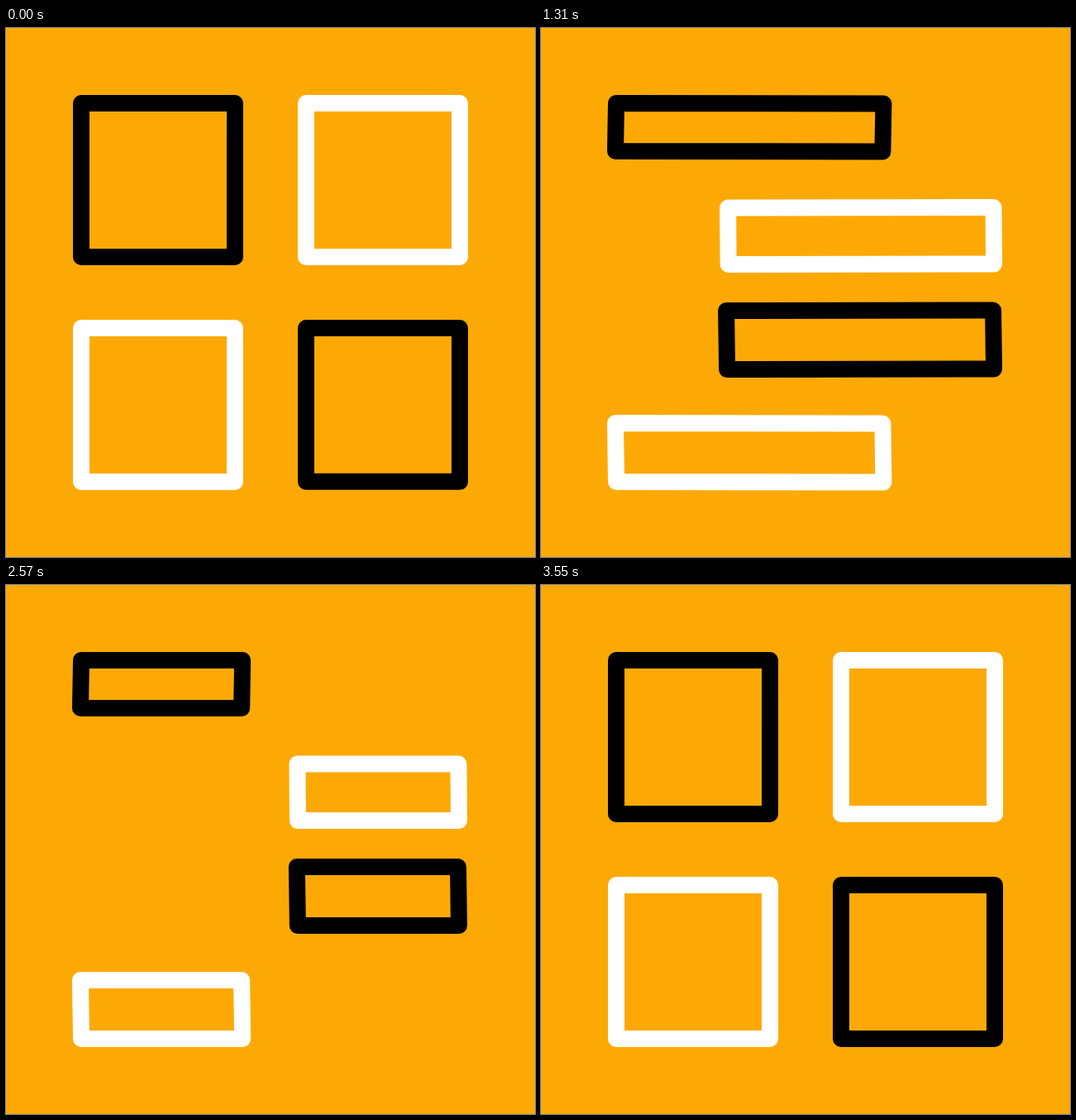
These frames come from a looping animation (640x640 px, 3.62 s). An HTML page:

```html
<!DOCTYPE html>
<html lang="en">
<head>
<meta charset="utf-8">
<title>Four frames</title>
<style>
  html, body { margin: 0; height: 100%; overflow: hidden; background: #fda905; }
  svg { display: block; width: 100%; height: 100%; }
  path { fill: none; stroke-width: 20; stroke-linejoin: round; }
</style>
</head>
<body>
<svg viewBox="0 0 640 640">
  <path stroke="#000"/>
  <path stroke="#fff"/>
  <path stroke="#fff"/>
  <path stroke="#000"/>
</svg>
<script>
const LOOP = 3620, STEP = 70, LEAD = 20;
const SIDE = 186, MARGIN = 91, PITCH = 272;

// top, bottom: edges when flattened; lean: slant of the sides; grow: sideways stretch
const boxes = [
  { top: 91, bottom: 149, lean: -1, grow: 273 },
  { top: 216.5, bottom: 285, lean: 0.5, grow: -269 },
  { top: 478, bottom: 549, lean: 1, grow: 273 },
  { top: 341, bottom: 412, lean: 1, grow: -272 }
];
const paths = document.querySelectorAll('path');

const mix = (a, b, k) => a + (b - a) * k;

function ease(t, from, to) {
  const p = Math.min(1, Math.max(0, (t - from) / (to - from)));
  return p * p * (3 - 2 * p);
}

function outline(box, i, flatten, stretch) {
  const right = i % 2, low = i >> 1;
  const corner = (u, v) => {
    const x = MARGIN + PITCH * right + SIDE * u;
    const y = MARGIN + PITCH * low + SIDE * v;
    const free = u !== right;            // the outer side stays anchored
    const shift = Math.min(0, v ? box.lean : -box.lean) - right;
    const sag = right + free;
    return [
      x + shift * flatten + (free ? box.grow * stretch : 0),
      mix(y, v ? box.bottom : box.top, flatten) + sag * stretch
    ];
  };
  return `M${[corner(0, 0), corner(1, 0), corner(1, 1), corner(0, 1)].join(' ')}Z`;
}

function draw(t) {
  const flatten = ease(t, -15, 815) - ease(t, 2660, 3560);
  const stretch = ease(t, 853, 1763) - ease(t, 1800, 2665);
  boxes.forEach((box, i) =>
    paths[i].setAttribute('d', outline(box, i, flatten, stretch)));
}

const start = performance.now();

function tick() {
  const t = (performance.now() - start) % LOOP;
  // Poses are held on a steady beat, about 14 a second.
  draw(Math.max(0, Math.floor((t + LEAD) / STEP) * STEP - LEAD));
  requestAnimationFrame(tick);
}
tick();
</script>
</body>
</html>
```
